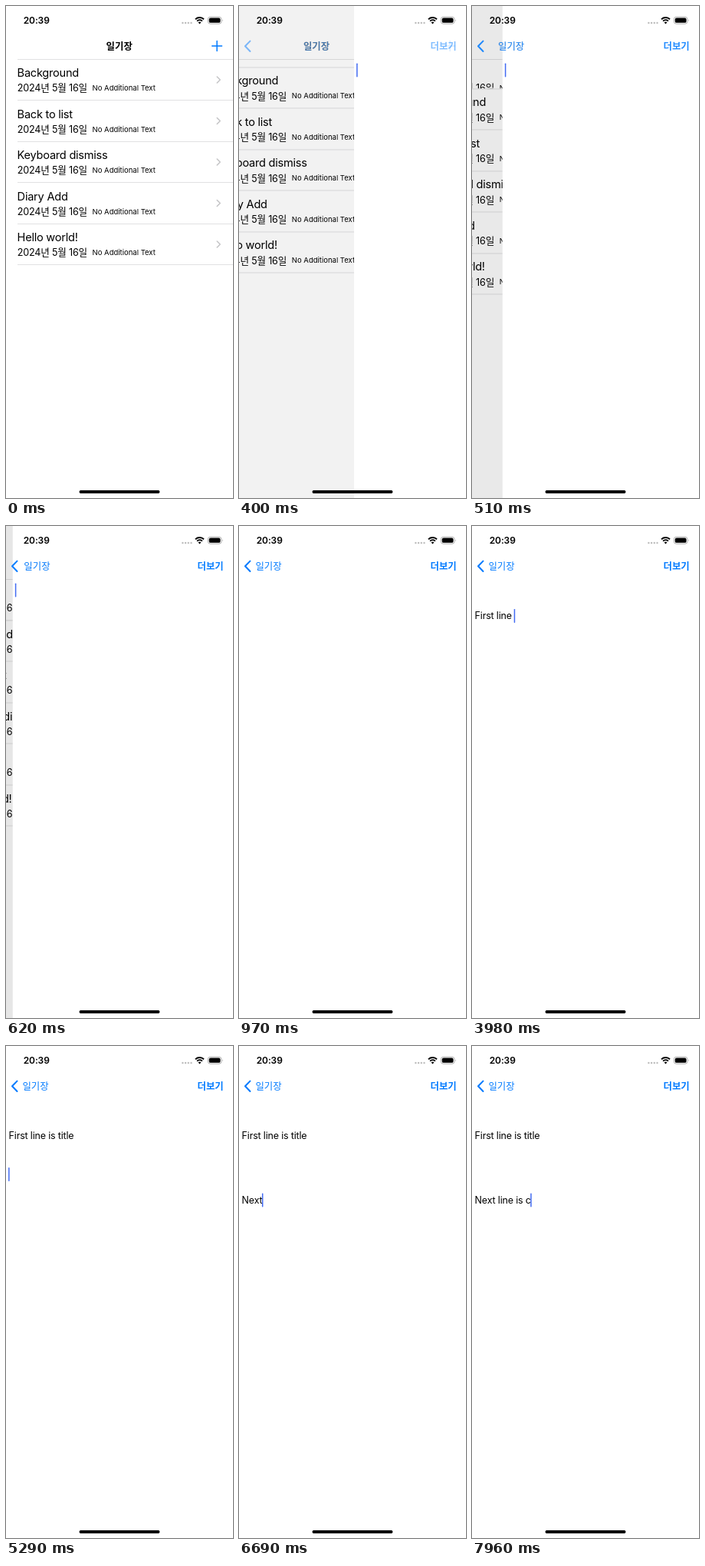
Write an HTML page that moves like this. It is 296 by 640 pixels and loops after 8 s.

```html
<!DOCTYPE html>
<html lang="ko">
<head>
<meta charset="utf-8">
<title>Diary</title>
<style>
  html, body { margin: 0; width: 100%; height: 100%; overflow: hidden; background: #fff; }
  svg { display: block; width: 296px; height: 640px; }
  text { font-family: Inter, "Noto Sans CJK KR", "Noto Sans CJK", sans-serif; white-space: pre; }
  .title { font-size: 14.6px; letter-spacing: -.25px; }
  .date { font-size: 12.6px; letter-spacing: -.2px; }
  .note { font-size: 9.5px; }
  .body { font-size: 12.5px; letter-spacing: -.18px; }
  .clock { font-size: 12px; font-weight: 600; letter-spacing: -.1px; }
  .nav { font-size: 12.4px; text-anchor: middle; }
  .bold { font-weight: 700; }
  .blue { fill: #007aff; }
  .line { fill: none; stroke: #007aff; stroke-linecap: round; stroke-linejoin: round; }
  .rule { fill: #e1e1e2; }
  .more { fill: none; stroke: #c4c4c6; stroke-width: 1.5; stroke-linecap: round; stroke-linejoin: round; }
</style>
</head>
<body>
<svg viewBox="0 0 296 640">
  <rect width="296" height="640" fill="#fff"/>
  <g id="list">
    <rect class="rule" x="15" y="69" width="281" height="1"/>
    <g id="fresh"></g>
    <g id="rows"><rect y="69" width="296" height="571" fill="#fff"/></g>
  </g>
  <rect id="dim" width="296" height="640"/>
  <g id="page">
    <rect width="296" height="640" fill="#fff"/>
    <g id="lines"></g>
    <rect id="caret" width="1.5" height="18" rx=".7" fill="#426bf2"/>
  </g>

  <path id="plus" class="line" stroke-width="1.5" d="M268.7 52h12.8M275.1 45.6v12.8"/>
  <path id="back" class="line" stroke-width="2" d="M14.5 45.6L8 52.3L14.5 59"/>
  <g id="heading">
    <text id="strong" class="nav bold" x="147.7" y="56.5">일기장</text>
    <text id="label" class="nav blue" x="147.7" y="56.5">일기장</text>
  </g>
  <text id="menu" class="nav bold blue" x="266.6" y="56.5">더보기</text>

  <text class="clock" x="22.7" y="23">20:39</text>
  <g fill="#bdbdbd">
    <circle cx="230.4" cy="22" r="1.2"/><circle cx="234.1" cy="22" r="1.2"/>
    <circle cx="237.8" cy="22" r="1.2"/><circle cx="241.5" cy="22" r="1.2"/>
  </g>
  <g fill="none" stroke="#000" stroke-width="1.9">
    <path d="M247 17.2a8 8 0 0 1 11 0"/>
    <path d="M249.1 19.6a5 5 0 0 1 6.8 0"/>
  </g>
  <path d="M252.5 23.4L250.6 21.3a2.8 2.8 0 0 1 3.8 0Z"/>
  <rect x="263.3" y="14.2" width="17.6" height="9" rx="3" fill="none" stroke="#a8a8a8" stroke-width=".9"/>
  <rect x="264.7" y="15.6" width="14.8" height="6.2" rx="1.9"/>
  <path d="M282 17.2q1.4 1.5 0 3Z" fill="#a8a8a8"/>
  <rect x="95.5" y="630" width="105" height="3.9" rx="1.95"/>
</svg>
<script>
const LOOP = 8000, WIDTH = 296, ROW = 53.5, LEADING = 16.7, LEFT = 3.6;
const $ = id => document.getElementById(id);

const diary = ["Background", "Back to list", "Keyboard dismiss", "Diary Add", "Hello world!"];
const note = "\n\nFirst line is title\n\n\n\n\nNext line is c";

// [time, characters typed]
const typing = [
  [0, 0], [1650, 1], [2040, 3], [2270, 4], [3090, 6], [3240, 7], [3520, 8],
  [3650, 11], [3840, 12], [3980, 13], [4190, 15], [4580, 16], [4730, 18],
  [4860, 20], [4990, 21], [5130, 22], [5290, 24], [5590, 25], [5800, 26],
  [6060, 28], [6180, 29], [6690, 30], [6960, 31], [7080, 33], [7260, 34],
  [7385, 36], [7510, 38], [7960, 40]
];
const blinks = [[970, 1220], [2780, 2920]];
const ticks = [0, 180, 290, 400, 510, 620, 740, 850, 970];

function entry(title, i) {
  const y = i * ROW, rule = Math.floor(122.5 + y);
  return `<text class="title" x="14.6" y="${92 + y}">${title}</text>
    <text class="date" x="14.8" y="${111.3 + y}">2024년 5월 16일</text>
    <text class="note" x="112.6" y="${110 + y}">No Additional Text</text>
    <path class="more" d="M275.2 ${92 + y}l4 4l-4 4"/>
    <rect class="rule" x="15" y="${rule}" width="281" height="1"/>`;
}
$("fresh").innerHTML = entry("", 0);
$("rows").innerHTML += '<rect class="rule" x="15" y="69" width="281" height="1"/>' +
  diary.map(entry).join("");

const lines = note.split("\n").map((_, i) => {
  const el = document.createElementNS("http://www.w3.org/2000/svg", "text");
  el.setAttribute("class", "body");
  el.setAttribute("x", LEFT);
  el.setAttribute("y", 88 + i * LEADING);
  $("lines").append(el);
  return el;
});

function spring(t, start, rate) {
  const s = Math.max(0, t - start) / 1000 * rate;
  const p = 1 - (1 + s) * Math.exp(-s);
  return p > .999 ? 1 : p;
}
function smooth(t, start, span) {
  const x = Math.min(1, Math.max(0, (t - start) / span));
  return x * x * (3 - 2 * x);
}
const move = (id, x, y = 0) => $(id).setAttribute("transform", `translate(${x} ${y})`);
const fade = (id, value) => $(id).setAttribute("opacity", value);

function push(time) {
  const t = ticks.filter(v => v <= time).pop();
  const p = spring(t, 302, 16.9);
  move("page", WIDTH * (1 - p));
  move("list", -.3 * WIDTH * p);
  move("rows", 0, ROW * smooth(t, 315, 300));
  move("heading", -109.2 * spring(t, 329, 20.5));
  fade("dim", .1 * p);
  fade("plus", t < 180 ? 1 : .3 * (1 - p));
  fade("strong", 1 - p);
  for (const id of ["label", "back", "menu"]) fade(id, p);
}

let shown = -1;
function type(time) {
  const count = typing.filter(s => s[0] <= time).pop()[1];
  if (count !== shown) {
    const parts = note.slice(0, count).split("\n");
    lines.forEach((el, i) => el.textContent = parts[i] || "");
    const row = parts.length - 1;
    const end = parts[row] ? lines[row].getComputedTextLength() : 0;
    $("caret").setAttribute("x", LEFT - .5 + end);
    $("caret").setAttribute("y", 74.5 + row * LEADING);
    shown = count;
  }
  fade("caret", blinks.some(([a, b]) => time >= a && time < b) ? 0 : 1);
}

const begin = performance.now();
function frame() {
  const time = (performance.now() - begin) % LOOP;
  push(time);
  type(time);
  requestAnimationFrame(frame);
}
frame();
</script>
</body>
</html>
```
